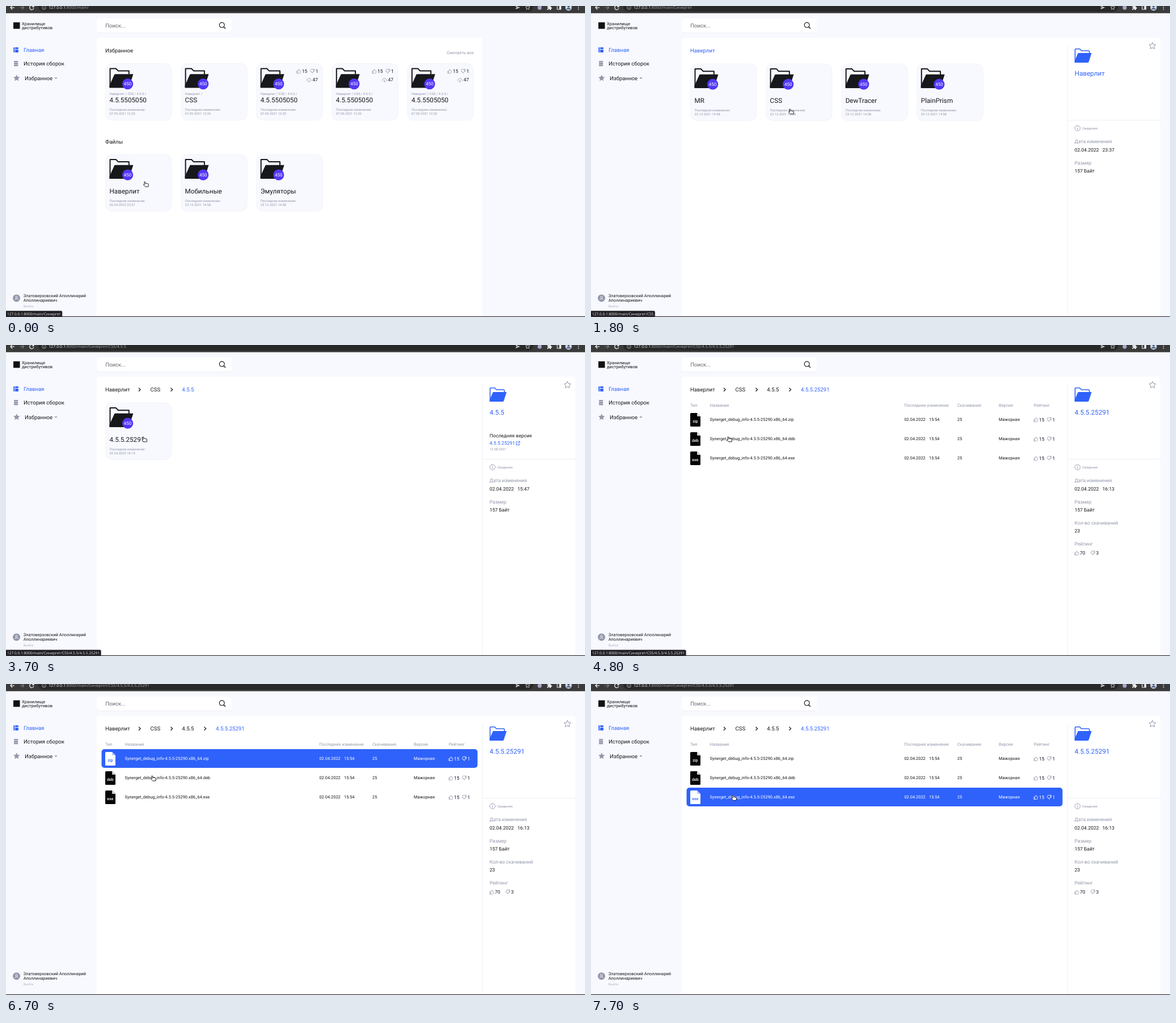
Write an HTML page that moves like this. It is 1021 px wide and 549 px high and loops after 8000 ms.

```html
<!DOCTYPE html>
<html lang="ru">
<head>
<meta charset="utf-8">
<title>Хранилище дистрибутивов</title>
<style>
html, body { margin: 0; width: 100%; height: 100%; overflow: hidden; background: #f8f9fe; }
svg { display: block; width: 100%; height: 100%; }
text { font-family: Roboto, sans-serif; text-rendering: geometricPrecision; white-space: pre; }
.bar { font-family: "Noto Sans", sans-serif; }
</style>
</head>
<body>
<svg viewBox="0 0 1021 549">
  <g id="frame"></g>
  <g id="page"></g>
  <g id="url"></g>
  <g id="status"></g>
  <g id="cursor"></g>
</svg>
<script>
const INK = '#17181c', GREY = '#9297ab', BLUE = '#2f62fa', BG = '#f8f9fe';
const LOOP = 8000, STEP = 133.1;
const T = { xs: 5.85, s: 7.45, m: 8.51, l: 9.57, xl: 11.7 };
const $ = id => document.getElementById(id);
const BRAND = 'Наверлит';

// Drawing helpers
const text = (x, y, s, size, fill = INK, extra = '') =>
  `<text x="${x}" y="${y}" font-size="${size}" fill="${fill}" ${extra}>${s}</text>`;
const rect = (x, y, w, h, fill, r = 0, extra = '') =>
  `<rect x="${x}" y="${y}" width="${w}" height="${h}" rx="${r}" fill="${fill}" ${extra}/>`;
const circle = (x, y, r, fill, extra = '') =>
  `<circle cx="${x}" cy="${y}" r="${r}" fill="${fill}" ${extra}/>`;
const fill = (d, color) => `<path d="${d}" fill="${color}"/>`;
const line = (d, color, w = 1) =>
  `<path d="${d}" fill="none" stroke="${color}" stroke-width="${w}" stroke-linejoin="round"/>`;
const at = (x, y, body, more = '') => `<g transform="translate(${x} ${y}) ${more}">${body}</g>`;

function star(cx, cy, r, inner = 0.48) {
  let d = '';
  for (let i = 0; i < 10; i++) {
    const a = i * Math.PI / 5, k = i % 2 ? r * inner : r;
    d += (i ? 'L' : 'M') + (cx + k * Math.sin(a)).toFixed(2) + ' ' + (cy - k * Math.cos(a)).toFixed(2);
  }
  return d + 'Z';
}

const THUMB = 'M.5 3.6H2V7.6H.5ZM2 3.8L3.8.6Q5 .5 4.8 2V3H6.9Q7.6 3.1 7.4 4L6.8 6.9Q6.6 7.6 6 7.6H2';
function votes(x, y, up, down, color = INK, icon = GREY, gap = 24) {
  const thumb = line(THUMB, icon, 0.75);
  return at(x, y - 7, thumb) + text(x + 9.6, y, up, T.m, color) +
    at(x + gap + 8, y + 1, thumb, 'rotate(180)') + text(x + gap + 9.6, y, down, T.m, color);
}

function folder(x, y) {
  return at(x, y,
    line('M1.1 33V1.1H11.5L15.5 5.2H34.4V11', INK, 2) +
    fill('M0 35V31L8.6 11.8Q9 10.8 10.2 10.8H42L35 32.4Q34.2 35 31.5 35Z', INK) +
    circle(32.2, 28.2, 9.6, '#5238f6') +
    text(32.2, 31.1, '450', 8, '#fff', 'text-anchor="middle"'));
}

function card(col, y, name, date, path = '', rated = false) {
  let s = rect(0.5, 0.5, 116.5, 100, BG, 11, 'stroke="#f0f1f8" stroke-width=".8"') +
    folder(7.4, 8.2) + text(7.5, 69.2, name, T.xl) +
    text(7.5, 84, 'Последнее изменение:', T.xs, GREY) + text(7.5, 91, date, T.xs, GREY);
  if (path) s += text(7.5, 56.3, path, T.xs, GREY);
  if (rated) s += votes(71, 17, 15, 1) +
    line('M90.5 31.5Q88.7 31 89 29.2Q89.4 27.8 91 27.9Q91.8 25.9 93.7 26.2Q95.4 26.5 95.7 28.3Q97.3 28.6 97.2 30.1Q97 31.4 95.6 31.5M93 28.8V33.2M91.6 31.8L93 33.3L94.4 31.8', GREY, 0.75) +
    text(99.3, 32.3, 47, T.m);
  return at(175 + col * STEP, y, s);
}

function panel(right) {
  return rect(160, 57, right - 160, 500, '#eceef6', 5) + rect(160, 56, right - 160, 500, '#fff', 5);
}

function crumbs(names) {
  const xs = [175, 254.5, 310.3, 370], arrows = [235.5, 292, 351];
  return names.map((n, i) => {
    const last = i === names.length - 1;
    return text(xs[i], 82, n, T.l, last ? BLUE : INK) +
      (last ? '' : line(`M${arrows[i] - 1.6} 75.6l3.2 3.1l-3.2 3.1`, INK, 1.2));
  }).join('');
}

function details(name, date, time, version, stats) {
  const x = 852.8;
  let s = rect(840, 70, 1, 478, '#eff0f6') + rect(841, 201, 163, 1, '#eff0f6') +
    at(x, 75,
      line('M.8 23V2Q.8 .8 2 .8H9L12 4H24.6Q26 4 26 5.4V9', BLUE, 1.6) +
      fill('M0 25V22L5.6 9Q6 8 7 8H30L25 23.5Q24.5 25 23 25Z', BLUE)) +
    line(star(990, 70.5, 6.3), GREY, 1) +
    text(x, 123.4, name, T.xl, BLUE) +
    circle(857.9, 215.7, 4.7, 'none', `stroke="${GREY}" stroke-width=".9"`) +
    line('M857.9 215V218.4M857.9 212.8V213.8', GREY, 1) +
    text(866.3, 217.8, 'Сведения', T.xs, GREY) +
    text(x, 242.4, 'Дата изменения', T.m, GREY) +
    text(x, 256.7, date, T.m) + text(901.8, 256.7, time, T.m) +
    text(x, 279.6, 'Размер', T.m, GREY) + text(x, 294, '157 Байт', T.m);
  if (version) s += text(x, 163, 'Последняя версия', T.m) +
    text(x, 176.4, '4.5.5.25291', T.m, BLUE) +
    line('M902 170.8H899.9V176.4H905.3V174M902.3 173.8L905.8 170.3M903.3 170.2H905.9V172.8', BLUE, 0.9) +
    text(x, 186, '12.08.2021', T.xs, GREY);
  if (stats) s += text(x, 317, 'Кол-во скачиваний', T.m, GREY) + text(x, 331.2, 23, T.m) +
    text(x, 354, 'Рейтинг', T.m, GREY) + votes(852.5, 370.2, 70, 3, INK, GREY, 28.5);
  return s;
}

function fileRow(i, ext, selected) {
  const color = selected ? '#fff' : INK, y = 134.4;
  return at(0, i * 34,
    (selected ? rect(168.5, 115, 663, 33, BLUE, 5) : '') +
    fill('M175 121.5Q175 120 176.5 120H187L193 126V142.5Q193 144 191.5 144H176.5Q175 144 175 142.5Z', selected ? '#fff' : '#050505') +
    fill('M187 120L193 126H188.3Q187 126 187 124.7Z', selected ? '#b9c9ff' : '#d5d5d5') +
    text(183.8, 136.7, ext, 7, selected ? BLUE : '#fff', 'text-anchor="middle" font-weight="500"') +
    text(209.5, y, 'Synerget_debug_info-4.5.5-25290.x86_64.' + ext, T.s, color) +
    text(552.4, y, '02.04.2022', T.s, color) + text(596, y, '15:54', T.s, color) +
    text(646, y, 25, T.s, color) + text(719, y, 'Мажорная', T.s, color) +
    votes(780.5, 134.9, 15, 1, color, selected ? '#fff' : GREY, 23.5));
}

const OLD = '23.12.2021 14:58';
const cards = (names, dates = []) => names.map((n, i) => card(i, 101.8, n, dates[i] || OLD)).join('');

const pages = {
  home() {
    const fav = '07.09.2021 12:20', path = BRAND + ' / CSS / 4.5.5 /';
    let s = panel(840) + text(175, 82, 'Избранное', T.l) +
      text(825, 85.2, 'Смотреть все', T.s, GREY, 'text-anchor="end"') + text(175, 243.4, 'Файлы', T.l);
    for (let i = 0; i < 5; i++)
      s += card(i, 101.2, i === 1 ? 'CSS' : '4.5.5505050', fav, i === 1 ? BRAND + ' /' : path, i > 1);
    return s + card(0, 261.7, BRAND, '02.04.2022 23:37') +
      card(1, 261.7, 'Мобильные', OLD) + card(2, 261.7, 'Эмуляторы', OLD);
  },
  root: () => panel(1004) + crumbs([BRAND]) + cards(['MR', 'CSS', 'DewTracer', 'PlainPrism']) +
    details(BRAND, '02.04.2022', '23:37'),
  css: () => panel(1004) + crumbs([BRAND, 'CSS']) +
    cards(['4.5.5', '4.6.0', '4.7.0', '4.6.5'], ['02.04.2022 15:47']) +
    details('CSS', '23.12.2021', '14:58', true),
  version: () => panel(1004) + crumbs([BRAND, 'CSS', '4.5.5']) +
    cards(['4.5.5.25291'], ['02.04.2022 16:13']) + details('4.5.5', '02.04.2022', '15:47', true),
  files(sel) {
    const heads = [[175, 'Тип'], [209.5, 'Название'], [552.4, 'Последнее изменение'],
      [646, 'Скачивания'], [719, 'Версия'], [780.7, 'Рейтинг']];
    return panel(1004) + crumbs([BRAND, 'CSS', '4.5.5', '4.5.5.25291']) +
      heads.map(([x, h]) => text(x, 108.5, h, T.s, GREY)).join('') +
      ['zip', 'deb', 'exe'].map((e, i) => fileRow(i, e, i === sel)).join('') +
      details('4.5.5.25291', '02.04.2022', '16:13', false, true);
  }
};

function chrome() {
  const W = '#e9e9eb';
  return rect(0, 0, 1021, 549, BG) + rect(0, 0, 1021, 12.7, '#3a3a3b') + rect(57, -10, 873, 20, '#282829', 9) +
    line('M15 2.8H8M11.3 -.7L7.9 2.8L11.3 6.3', W, 1.3) +
    line('M24.5 2.8H31.5M28.2 -.7L31.6 2.8L28.2 6.3', '#77777a', 1.3) +
    line('M48.4 1.1A3.6 3.6 0 1 0 48.8 3.8M49 -1V1.6H46.3', W, 1.3) +
    circle(67, 2.8, 3.4, 'none', 'stroke="#b9babd" stroke-width=".8"') + line('M67 2.4V4.7M67 .8V1.6', '#b9babd', 0.9) +
    fill('M898.5 -.5L906.5 2.8L898.5 6.1L899.6 3.3L903 2.8L899.6 2.3Z', '#cfcfd2') +
    line(star(920, 2.9, 4), '#cfcfd2', 0.9) + circle(941, 2.9, 3.6, '#aaa5c8') +
    fill('M954.5 .5H956.5Q956.3 -1.5 958 -1.5T959.5 .5H961V2.3Q962.8 2.2 962.8 3.7T961 5.1V7H958.8Q958.8 5.3 957.4 5.3T956 7H954.5V4.8Q956 4.7 956 3.6T954.5 2.4Z', W) +
    line('M972 -.5H978.5V6H972Z', W, 1.2) + rect(975.5, -.5, 3, 6.5, W) +
    circle(992, 2.5, 5.7, '#c8d6ee') + circle(992, 1, 1.8, '#4b5364') + fill('M988.3 6Q988.5 3.4 992 3.4T995.7 6Z', '#4b5364') +
    [-.2, 2.8, 5.8].map(y => circle(1009.5, y, 0.9, W)).join('') +
    rect(13, 28.8, 11.5, 11.5, '#111') +
    text(28, 33.5, 'Хранилище', 7.6) + text(28, 40.5, 'дистрибутивов', 7.6) +
    rect(160, 23, 238, 25, '#eff0f7', 5) + rect(160, 22, 238, 25, '#fff', 5) +
    text(175.2, 38.3, 'Поиск...', T.l, '#65676f') +
    circle(380.7, 33.6, 4.4, 'none', `stroke="${INK}" stroke-width="1.2"`) + line('M383.9 36.8L387 40', INK, 1.3) +
    rect(13.3, 73, 2, 9, BLUE) + rect(16.2, 73, 5.6, 3, BLUE) + rect(16.2, 77, 5.6, 5, BLUE) +
    text(31, 81, 'Главная', T.l, BLUE) +
    [97, 100.3, 103.6].map(y => rect(14, y, 7.2, 2.6, GREY, 0.4)).join('') +
    text(31, 105, 'История сборок', T.l) +
    fill(star(18.7, 127.3, 6), GREY) + text(33, 130.5, 'Избранное', T.l) + fill('M85.3 126.2H90.7L88 129Z', GREY) +
    circle(18.5, 515.7, 6.5, GREY) +
    circle(18.5, 514, 1.7, 'none', 'stroke="#fff" stroke-width=".8"') + line('M15.4 519Q15.6 516.8 18.5 516.8T21.6 519', '#fff', 0.8) +
    text(30.7, 513.8, 'Златоверховский Аполлинарий', T.s) + text(30.7, 522.4, 'Аполлинариевич', T.s) +
    text(30.7, 532, 'Выйти', T.xs, '#b3b7c6');
}

const HOST = '127.0.0.1', MAIN = ':8000/main/', SYN = 'Синергет', CSS = SYN + '/CSS',
  V = CSS + '/4.5.5', BUILD = V + '/4.5.5.25291';

// Start time, page, address, hovered link, selected row
const scenes = [
  [0, 'home', '', SYN],
  [1000, 'root', SYN, SYN],
  [1300, 'root', SYN, null],
  [2400, 'css', CSS, CSS + '/4.6.0'],
  [3500, 'css', V, V],
  [3700, 'version', V, BUILD],
  [4800, 'files', BUILD, BUILD],
  [5300, 'files', BUILD, null],
  [6200, 'files', BUILD, null, 0],
  [7200, 'files', BUILD, null, 1],
  [7700, 'files', BUILD, null, 2]
];
const stops = [[0, 241.8, 309.6], [2000, 367.5, 157.6], [3500, 239, 161.5], [5300, 246.8, 145],
  [5500, 256, 131.6], [6700, 254.8, 161.6], [7500, 247, 196]];
const HAND = 'M1.9 1.7Q1.7.6 2.6.5T3.8 1.3L4.3 3.4L8 4Q9.6 4.3 9.5 5.6L9.1 9.4H3.9L.8 6.3Q.3 5.4 1.1 5T3 5.5Z';
const ARROW = 'M3.6.6V9.2L5.6 7.4L7 10.3L8.4 9.7L7.1 6.8H9.7Z';

const latest = (list, t) => list.filter(s => s[0] <= t).pop();
const shown = {};
function put(id, key, draw) {
  if (shown[id] === key) return false;
  shown[id] = key;
  $(id).innerHTML = draw();
  return true;
}

function pointer(t) {
  let [, x, y] = latest(stops, t);
  if (t >= 1300 && t < 2000) {
    const u = (Math.floor((t - 1300) / 100) + 1) / 8, e = u * u * (3 - 2 * u);
    x += (stops[1][1] - x) * e;
    y += (stops[1][2] - y) * e;
  }
  return { x, y, hand: t < 1100 || y < 202 };
}

function render(t) {
  let [, page, url, link, sel] = latest(scenes, t);
  const p = pointer(t);
  if (page === 'root' && p.hand && t >= 1300) link = CSS;

  put('page', page + sel, () => pages[page](sel));
  put('url', url, () =>
    `<text class="bar" x="75" y="5.4" font-size="7.14" fill="#e8eaed">${HOST}<tspan fill="#9c9fa4">${MAIN}${url}</tspan></text>`);
  const changed = put('status', String(link), () =>
    (link ? rect(-3, 538.3, 10, 14, '#1d1d21', 2, 'stroke="#4a4a50" stroke-width=".6"') +
      text(2, 546.2, HOST + MAIN + link, 6.54, '#e4e4e6', 'class="bar"') : '') +
    rect(0, 547.8, 1021, 1.2, '#37323b'));
  if (changed && link) {
    const [box, label] = $('status').children;
    box.setAttribute('width', label.getComputedTextLength() + 7.5);
  }
  put('cursor', p.hand, () =>
    `<path d="${p.hand ? HAND : ARROW}" fill="#fff" stroke="#111" stroke-width=".95" stroke-linejoin="round"/>`);
  $('cursor').setAttribute('transform', `translate(${p.x} ${p.y})`);
}

$('frame').innerHTML = chrome();
const start = performance.now();
function tick() {
  render((performance.now() - start) % LOOP);
  requestAnimationFrame(tick);
}
tick();
</script>
</body>
</html>
```
